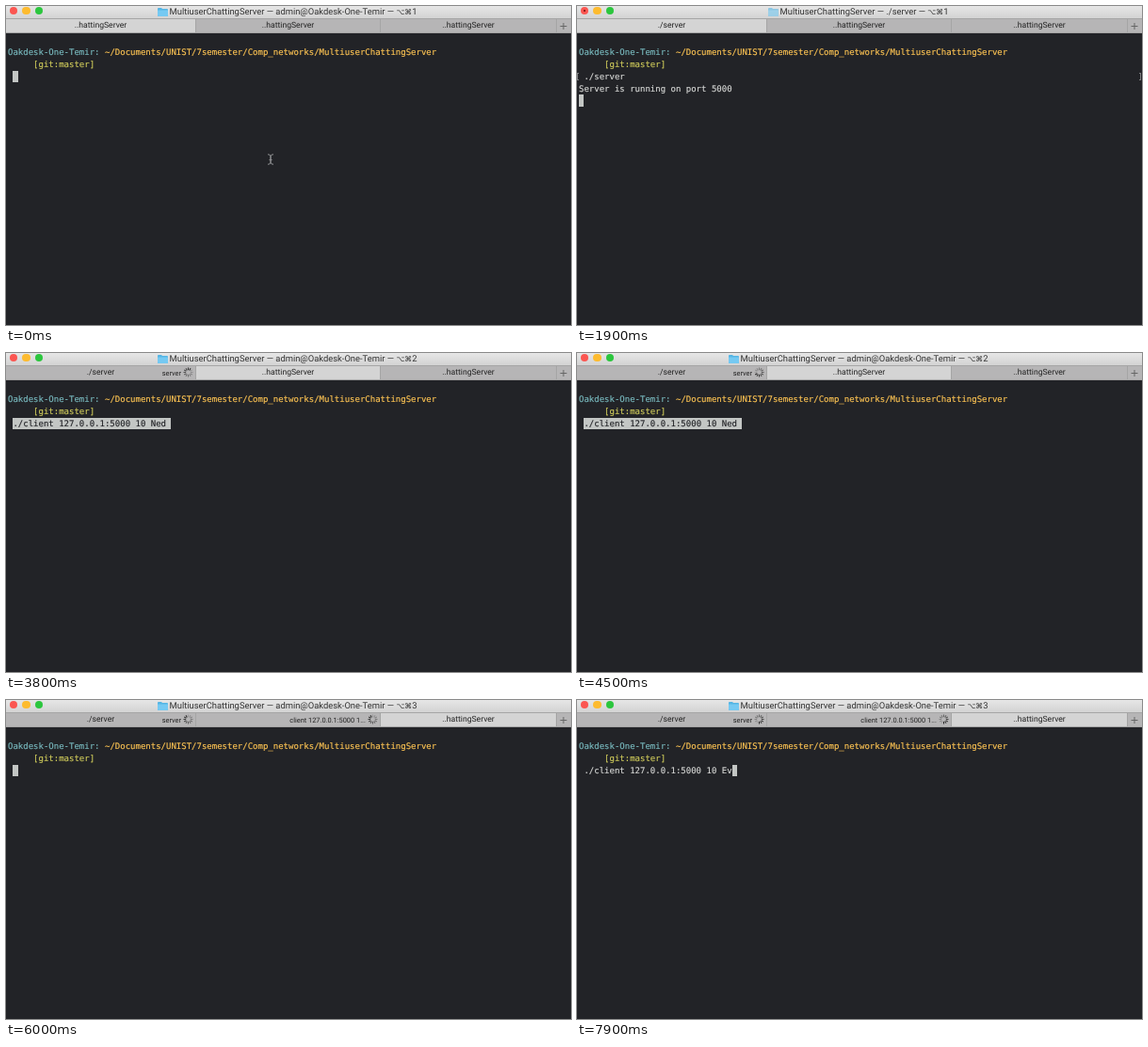
An HTML page that plays this animation: 600 by 339 pixels, repeating every 8000 ms.

```html
<!DOCTYPE html>
<html lang="en">
<head>
<meta charset="utf-8">
<title>Terminal session</title>
<style>
  html, body { margin: 0; width: 100%; height: 100%; overflow: hidden; background: #222327; }
  body { position: relative; text-rendering: geometricPrecision; }
  body div, body svg { position: absolute; box-sizing: border-box; }
  .ui { font-family: Roboto, "Open Sans", sans-serif; color: #222; white-space: pre; }

  #bar { left: 0; top: 0; width: 600px; height: 13px; background: linear-gradient(#e6e6e6, #d3d3d3); }
  .light { top: 1px; width: 8.4px; height: 8.4px; border-radius: 50%; }
  #dot { left: 2.9px; top: 2.9px; width: 2.6px; height: 2.6px; border-radius: 50%; background: #6d0d0b; }
  #title { left: 0; top: 1px; width: 597px; height: 11px; display: flex; justify-content: center;
           align-items: center; font-size: 9.4px; line-height: 11px; color: #333; }
  #title svg { position: static; margin: -1px 2px 0 0; }
  #title .keys { font: 7.8px "DejaVu Sans", sans-serif; }

  .tab { top: 13px; height: 16px; border: solid #a5a5a5; border-width: 1px 1px 1px 0;
         background: #b6b5b6; font-size: 8.6px; line-height: 15px; text-align: center; }
  .tab.active { background: #d4d4d4; }
  .busy { right: 15px; top: 0; font-size: 7.4px; line-height: 15px; }
  .spin { right: 2px; top: 1.2px; width: 11px; height: 11px; }

  #term { left: 2px; top: 44.3px; font: 9px/12.75px "DejaVu Sans Mono", monospace;
          color: #d6d7d5; white-space: pre; -webkit-text-stroke: .15px; }
  .host { color: #78b9be; }
  .path { color: #fec453; }
  .git { color: #cdc95a; }
  .inv { display: inline-block; height: 12.75px; margin-top: -1.2px; line-height: 15.15px;
         vertical-align: top; background: #c3c6c4; color: #222327; }
  .mark { top: 70.5px; width: 2px; height: 8px; border: 1px solid #7d7e80; }
  .mark.l { left: 0; border-right: 0; }
  .mark.r { left: 597px; border-left: 0; }
  #beam { left: 277px; top: 157px; }
</style>
</head>
<body>
<div id="bar">
  <div class="light" style="left:3.7px;background:#fb5651"><div id="dot"></div></div>
  <div class="light" style="left:17.2px;background:#fdbb2f"></div>
  <div class="light" style="left:30.8px;background:#2cc63e"></div>
  <div id="title" class="ui">
    <svg id="folder" width="11" height="9" viewBox="0 0 11 9">
      <path d="M0 1Q0 0 1 0H4L5 1H10Q11 1 11 2V8Q11 9 10 9H1Q0 9 0 8Z" fill="#55b5e4"/>
      <path d="M0 2.5H11V8Q11 9 10 9H1Q0 9 0 8Z" fill="#75c9f2"/>
    </svg><span id="caption"></span>
  </div>
</div>
<div class="tab ui" style="left:0;width:202px"></div>
<div class="tab ui" style="left:202px;width:196px"></div>
<div class="tab ui" style="left:398px;width:187px"></div>
<div class="tab ui" style="left:585px;width:15px;border-right:0">
  <svg width="15" height="14" style="left:0;top:0"><path d="M3.5 7.5h7M7 4v7" stroke="#666"/></svg>
</div>
<div id="term"></div>
<div class="mark l"></div>
<div class="mark r"></div>
<svg id="beam" width="8" height="12" fill="none" stroke="#8e8f91">
  <path d="M1 .7Q4 .7 4 3V9Q4 11.3 1 11.3M7 .7Q4 .7 4 3V9Q4 11.3 7 11.3M2.5 6.5h3"/>
</svg>
<script>
const LOOP = 8000;
const HOST = 'Oakdesk-One-Temir';
const FOLDER = 'MultiuserChattingServer';
const SHORT = '..hattingServer';
const SERVER = './server';
const ARGS = '127.0.0.1:5000 10 ';
const CLIENT = './client ' + ARGS;
const GUEST = 'Ned';
const SECOND = 'Ev';

const $ = id => document.getElementById(id);
const tabs = [...document.querySelectorAll('.tab')].slice(0, 3);
const marks = document.querySelectorAll('.mark');
const span = (cls, text) => `<span class="${cls}">${text}</span>`;
const steps = (t, start, every, max) =>
  Math.max(0, Math.min(max, Math.floor((t - start) / every) + 1));

function serverTab(t) {
  const running = t >= 1200;
  return {
    tab: 0, running,
    line: SERVER.slice(0, steps(t, 400, 100, SERVER.length)),
    output: t >= 1300 ? ['Server is running on port 5000'] : null
  };
}

function clientTab(t) {
  const running = t >= 4600;
  return {
    tab: 1, running,
    line: t >= 3500 ? CLIENT + GUEST : '',
    pasted: t >= 3500 && !running,
    output: t >= 4700 ? [
      `User has entered the following parameters: ${ARGS}${GUEST}`,
      `Hello ${GUEST}! This is room #10`
    ] : null
  };
}

function secondClientTab(t) {
  const erased = steps(t, 7200, 100, GUEST.length);
  const typed = steps(t, 7700, 200, SECOND.length);
  const name = GUEST.slice(0, GUEST.length - erased) + SECOND.slice(0, typed);
  return {
    tab: 2, running: false,
    line: t >= 6600 ? CLIENT + name : '',
    pasted: t >= 6600 && !erased
  };
}

const scene = t => t < 2500 ? serverTab(t) : t < 5400 ? clientTab(t) : secondClientTab(t);

function terminalHTML({ line, pasted, output }) {
  const cursor = span('inv', ' ');
  const prompt = span('host', HOST + ':') + ' ' +
    span('path', '~/Documents/UNIST/7semester/Comp_networks/' + FOLDER) +
    '\n     ' + span('git', '[git:master]') + '\n ';
  if (pasted) return prompt + span('inv', line + ' ');
  if (output) return prompt + line + '\n' + output.join('\n') + '\n' + cursor;
  return prompt + line + cursor;
}

const spokes = Array.from({ length: 12 }, (_, i) =>
  `<path d="M0-2.4V-5" transform="rotate(${i * 30})" opacity="${0.2 + i * 0.07}"/>`).join('');
const busyHTML = text => `<div class="busy">${text}</div>
  <svg class="spin" viewBox="-5.5 -5.5 11 11" stroke="#222" stroke-width="1"><g>${spokes}</g></svg>`;

function tabHTML(i, s) {
  if (i === s.tab) return s.running ? s.line.split(' ')[0] : SHORT;
  if (i > s.tab) return SHORT;
  return i === 0 ? SERVER + busyHTML('server') : busyHTML('client 127.0.0.1:5000 1...');
}

let shown = '';
function draw(s) {
  const key = JSON.stringify(s);
  if (key === shown) return;
  shown = key;
  const job = s.running ? s.line : 'admin@' + HOST;
  $('caption').innerHTML = `${FOLDER} — ${job} — ${span('keys', '⌥⌘')}${s.tab + 1}`;
  $('folder').style.opacity = s.running ? 0.6 : 1;
  $('dot').hidden = !s.running;
  marks.forEach(m => m.hidden = !s.running);
  $('term').innerHTML = terminalHTML(s);
  tabs.forEach((el, i) => {
    el.classList.toggle('active', i === s.tab);
    el.innerHTML = tabHTML(i, s);
  });
}

function tick(now) {
  const t = now % LOOP;
  draw(scene(t));
  $('beam').style.display = t < 100 ? '' : 'none';
  const turn = Math.floor(t / 100) * 30;
  document.querySelectorAll('.spin g').forEach(g => g.setAttribute('transform', `rotate(${turn})`));
  requestAnimationFrame(tick);
}
tick(0);
</script>
</body>
</html>
```
